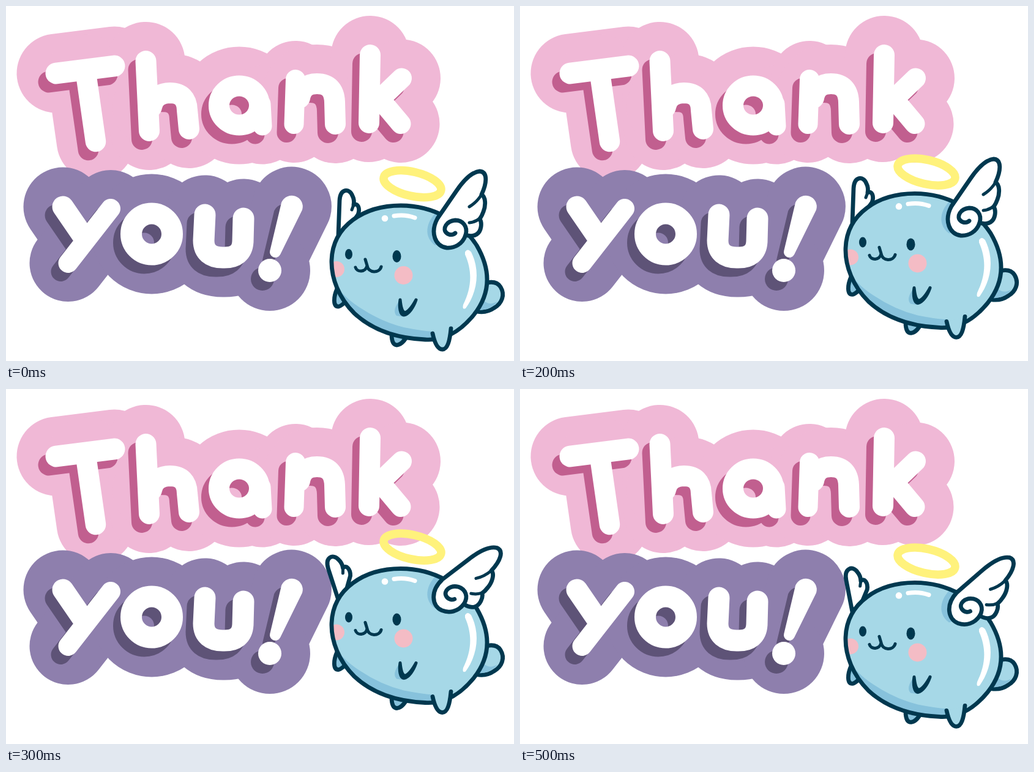
Write an HTML page that moves like this. It is 830 px wide and 580 px high and loops after 600 ms.

```html
<!DOCTYPE html>
<html lang="en">
<head>
<meta charset="utf-8">
<title>Thank you!</title>
<style>
html, body { margin: 0; width: 100%; height: 100%; overflow: hidden; background: #fff; }
svg { display: block; width: 830px; height: 580px; }
.ink { stroke: #00384f; stroke-width: 6.8; }
.thin { stroke: #00384f; stroke-width: 5; }
.light { fill: #a6d8e7; }
.shade { fill: #87c2dc; }
.white { fill: #fff; }
.navy { fill: #00384f; }
.cheek { fill: #f4bcc5; }
</style>
</head>
<body>
<svg viewBox="0 0 830 580" fill="none" stroke-linecap="round" stroke-linejoin="round" role="img" aria-label="Thank you!">
  <defs>
    <path id="shape" d="M645 326C700 326 745 354 769 391C793 432 792 470 764 505C741 533 716 547 685 545C640 543 599 530 569 502C544 477 531 445 532 415C534 359 585 326 645 326Z"/>
    <clipPath id="inside"><use href="#shape"/></clipPath>
  </defs>
  <g id="lettering"></g>

  <g id="farWing">
    <path class="ink white" d="M543 374L545 318C546 298 561 297 566 310C569 316 569 320 568 325C575 321 579 331 575 341L560 362Z"/>
    <path class="thin" d="M568 325L565 333"/>
  </g>

  <g id="body">
    <path class="ink light" d="M774 460C784 449 801 448 808 459C816 472 810 486 798 493C788 500 779 501 769 499"/>
    <path class="shade" d="M772 497C784 497 796 492 803 483C793 488 785 487 780 480Z"/>
    <path class="ink shade" d="M541 462C535 475 534 491 543 491C548 491 552 484 558 482"/>
    <path class="ink shade" d="M630 536C630 547 633 554 639 554C647 553 652 545 656 538"/>
    <use href="#shape" class="light"/>
    <g clip-path="url(#inside)">
      <path class="shade" d="M528 440Q547 473 577 492Q613 516 650 525Q680 531 699 532V560H528Z"/>
      <path class="shade" d="M708 333C690 346 678 374 701 391L730 380Z"/>
      <circle class="cheek" cx="540" cy="430" r="13"/>
    </g>
    <use href="#shape" class="ink"/>
    <path class="ink light" d="M697 535C700 549 705 561 713 561C721 561 725 548 727 527"/>
    <circle class="cheek" cx="649.5" cy="440" r="15"/>
    <ellipse class="navy" cx="560" cy="405.5" rx="6" ry="8.5"/>
    <ellipse class="navy" cx="638.5" cy="409" rx="7" ry="10"/>
    <path class="thin" d="M571 427C573 435 588 436 590 424L587 414M590 424C592 437 610 437 613 426"/>
    <path class="shade" d="M644 480Q630 497 638 506L650 508Z"/>
    <path class="thin navy" d="M644 480C642 492 644 505 650 505C658 504 666 492 670 480C664 491 658 499 652 501C646 500 645 490 644 480Z" stroke-width="4"/>
    <circle class="white" cx="619" cy="347" r="5.3"/>
    <path stroke="#fff" stroke-width="7" d="M634 343Q652 340 668 346"/>
    <path class="white" d="M750 402Q754 395 760 402C774 430 772 465 751 494Q745 497 747 488C760 462 763 435 750 406Z"/>
  </g>

  <g id="nearWing">
    <path class="ink white" d="M705 347L736 302C749 283 762 271 774 270C787 271 786 289 777 308C784 312 784 326 780 336C778 342 776 345 774 348C778 354 777 368 769 373C764 376 757 376 751 374C746 389 733 396 720 395C702 393 692 371 705 347Z"/>
    <path class="thin" d="M777 308Q769 321 757 328M774 347Q767 353 757 354"/>
    <path class="ink" d="M751 374C755 360 746 350 734 350C720 351 712 364 720 371C725 375 731 374 734 371"/>
  </g>

  <ellipse id="halo" rx="48" ry="19.7" stroke="#fff27c" stroke-width="13.5"/>
</svg>
<script>
const $ = id => document.getElementById(id);

// Each stroke: path, pen width, and whether its inside is filled too.
const thank = [
  ["M82 110L177 98", 35], ["M130.5 110L146.5 221.5", 33.5],
  ["M228.5 90L234 204", 34], ["M238 165Q242 143 268 142Q295 142 296 170L299 201", 34],
  ["M348 162.5a33 32 0 1 1 66 0a33 32 0 1 1 -66 0Z", 34], ["M417 160L419 196", 31],
  ["M473 120L470.5 193", 32], ["M480 150Q484 127 508 127Q536 127 537 157L538 193", 34],
  ["M595 80L593 191", 34], ["M646.5 118L611 152L645 192.5", 33]
];
const you = [
  ["M93 328L128 379", 35], ["M171 331L101.5 420", 32],
  ["M204.5 372.5a33.5 33.5 0 1 1 67 0a33.5 33.5 0 1 1 -67 0Z", 35],
  ["M325 341L323 383C323 402 335 411 354 411C376 412 386 402 387 385L388 347", 35],
  ["M440 402L458.6 324A9 9 0 0 1 475.5 330Z", 18, true], ["M431 432h.01", 38]
];

function layer(strokes, color, grow, shift) {
  const parts = strokes.map(([d, w, solid]) => {
    const filled = solid || (grow && d.endsWith("Z"));
    return `<path d="${d}" stroke-width="${w + grow}" fill="${filled ? color : "none"}"/>`;
  });
  return `<g stroke="${color}" transform="translate(${shift})">${parts.join("")}</g>`;
}

function word(strokes, back, shadow) {
  return layer(strokes, back, 94, "0 0") + layer(strokes, shadow, 0, "-12 14") +
    layer(strokes, "#fff", 0, "0 0");
}

$("lettering").innerHTML = word(thank, "#f0b8d6", "#c15f8f") + word(you, "#8e7fad", "#5e5377");

// lift of the body; [dx, dy, turn] of each wing
const rest = { lift: 0, near: [0, 0, 0], far: [0, 0, 0] };
const rise = { lift: -9.6, near: [2.5, -9.3, 14.5], far: [0, -7.5, -13] };
const high = { lift: -19.6, near: [0, -20, 0], far: [0, -20, 0] };
const peak = { lift: -32.5, near: [0, -29.5, 18], far: [0, -27.5, -20] };
const poses = [rest, rise, high, peak, high, rise];
const STEP = 100;

function place(id, [dx, dy, turn], pivot) {
  $(id).setAttribute("transform", `translate(${dx} ${dy}) rotate(${turn} ${pivot})`);
}

function draw(time) {
  const pose = poses[Math.floor(time / STEP) % poses.length];
  place("body", [0, pose.lift, 0], "0 0");
  place("nearWing", pose.near, "728 368");
  place("farWing", pose.far, "545 372");
  place("halo", [664, 290.7 + pose.lift, 13], "0 0");
}

const start = performance.now();
function tick() {
  draw(performance.now() - start);
  requestAnimationFrame(tick);
}
tick();
</script>
</body>
</html>
```
